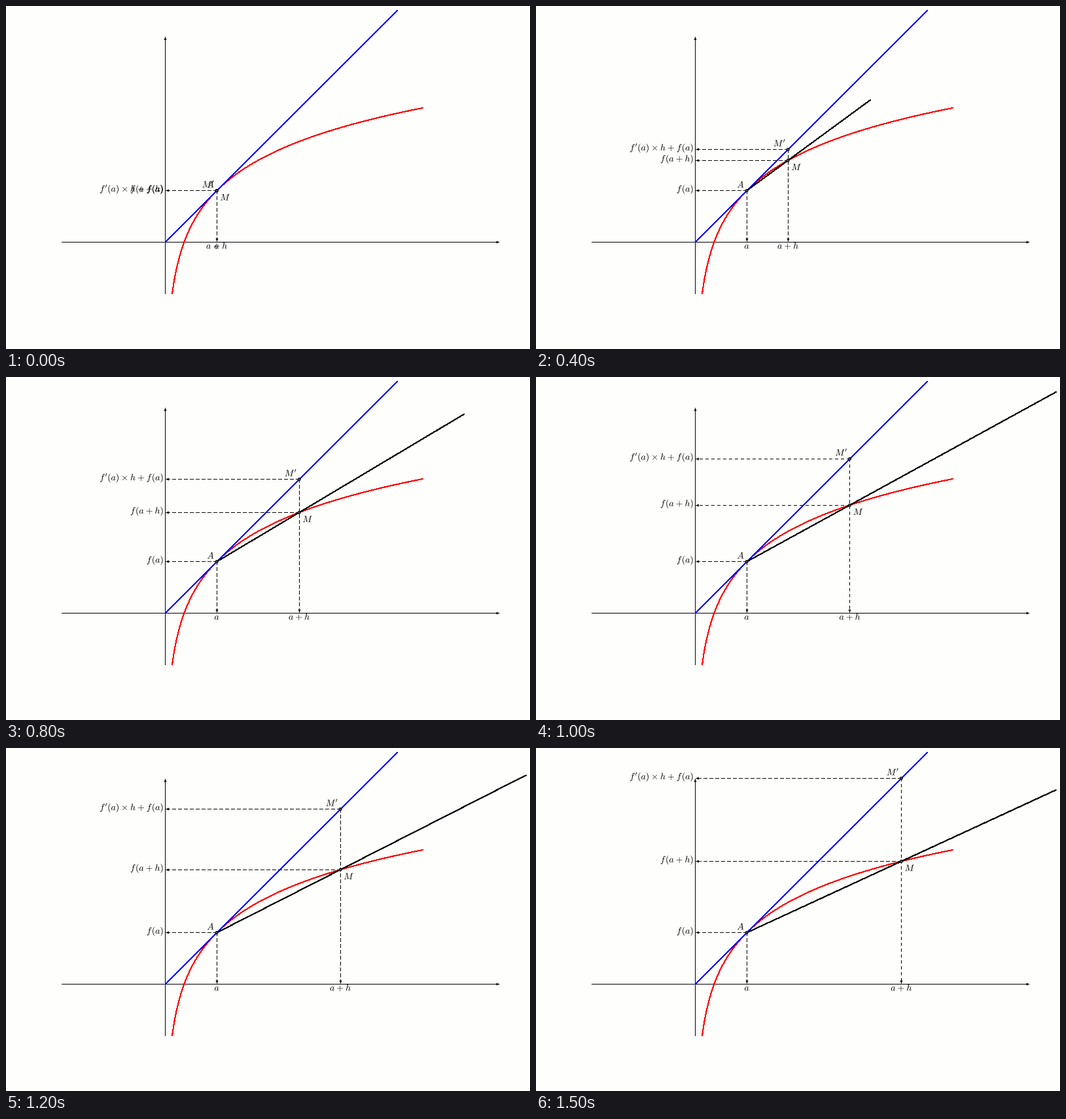
Write a matplotlib script that moves like this. It is 801 by 525 pixels and loops after 1.6 s.

```python
import numpy as np
import matplotlib.pyplot as plt
from matplotlib.animation import FuncAnimation
from matplotlib.collections import LineCollection
from matplotlib.patches import Circle, PathPatch, Polygon
from matplotlib.path import Path
from matplotlib.textpath import TextPath

W, H = 801, 525
UNIT = 78.74                 # pixels per graph unit
OX, OY = 243.4, H - 361.4    # graph origin, y pointing up
X_MAX = 7
STEP = 0.2
N_FRAMES = 16

plt.rcParams.update({"mathtext.fontset": "cm", "path.snap": False})

# 72 dpi makes one point equal one pixel
fig = plt.figure(figsize=(W / 72, H / 72), dpi=72, facecolor="#fefefc")
ax = fig.add_axes([0, 0, 1, 1])

F_A = r"$f\hspace{0.1}(a)$"
F_AH = r"$f\hspace{0.1}(a\hspace{0.05}+\hspace{0.05}h)$"
F_TAN = (r"$f'(a)\hspace{0.05}\times\hspace{0.05}h"
         r"\hspace{0.05}+\hspace{0.05}f\hspace{0.1}(a)$")
AH = r"$a\hspace{0.05}+\hspace{0.05}h$"


def f(x):
    return np.log(x) + 1


def to_px(x, y):
    return OX + UNIT * x, OY + UNIT * y


def centre(v):
    """Middle of the pixel that holds v."""
    return np.floor(v) + 0.5


def stroke(x, y, color):
    """Crisp line, one pixel thick along its main direction."""
    pts = np.column_stack(to_px(np.asarray(x, float), np.asarray(y, float)))
    segs = np.stack([pts[:-1], pts[1:]], axis=1)
    d = np.abs(np.diff(pts, axis=0))
    widths = 1.04 * d.max(axis=1) / np.hypot(d[:, 0], d[:, 1])
    ax.add_collection(LineCollection(
        segs, colors=color, linewidths=widths, antialiaseds=False,
        capstyle="projecting"), autolim=False)


def arrow(start, end, dashed=False):
    """Horizontal or vertical line with a small solid tip at its end."""
    p, q = np.array(to_px(*start)), np.array(to_px(*end))
    axis = 0 if start[1] == end[1] else 1
    p[1 - axis] = q[1 - axis] = centre(p[1 - axis])
    u = (q - p) / np.hypot(*(q - p))
    v = np.array([-u[1], u[0]])
    base = q - 5 * u
    style = (0, (4.15, 4.15)) if dashed else "-"
    ax.plot([p[0], base[0]], [p[1], base[1]], color="black", lw=1,
            ls=style, aa=False, dash_capstyle="butt", solid_capstyle="butt")
    side = [(1.9, 0.55), (3.8, 1.2), (5.5, 2.1)]
    tip = [q] + [q - b * u + w * v for b, w in side]
    tip += [q - b * u - w * v for b, w in side[::-1]]
    ax.add_patch(Polygon(tip, fc="black", lw=0, zorder=3))


def label(text, x, y, align):
    """Math text with its baseline at y, aligned on its visible edge."""
    glyphs = TextPath((0, 0), text, size=13.84)
    box = glyphs.get_extents()
    edge = {"left": box.x0, "right": box.x1,
            "center": (box.x0 + box.x1) / 2}[align]
    path = Path(glyphs.vertices + [x - edge, y], glyphs.codes)
    ax.add_patch(PathPatch(path, fc="black", lw=0, zorder=4))


def dot(x, y):
    ax.add_patch(Circle(to_px(x, y), 2, fc="#4d4d4d", ec="black", lw=1,
                        zorder=5))


def value_label(text, y):
    label(text, 239.5, to_px(0, y)[1] - 1.5, "right")


def abscissa_label(text, x):
    label(text, to_px(x, 0)[0], H - 371.5, "center")


def above_left(text, x, y):
    px, py = to_px(x, y)
    label(text, px - 4.8, py + 4.9, "right")


def below_right(text, x, y):
    px, py = to_px(x, y)
    label(text, px + 5.8, py - 14.8, "left")


def draw(n):
    h = STEP * n
    x = 1 + h
    curve, tangent = f(x), 1 + h

    ax.clear()
    ax.set(xlim=(0, W), ylim=(0, H), autoscale_on=False)
    ax.axis("off")

    arrow((-2, 0), (6.5, 0))
    arrow((0, -1), (0, 4))
    xs = np.geomspace(np.exp(-2), 5, 90)
    stroke(xs, f(xs), "red")
    stroke([0, 4.5], [0, 4.5], "blue")

    if n:
        end = min(1 + 3 * h, X_MAX)
        slope = (curve - 1) / h
        stroke([1, end], [1, 1 + slope * (end - 1)], "black")

    arrow((1, 1), (1, 0), dashed=True)
    arrow((1, 1), (0, 1), dashed=True)
    if n:
        arrow((x, tangent), (x, 0), dashed=True)
        arrow((x, tangent), (0, tangent), dashed=True)
        arrow((x, curve), (0, curve), dashed=True)

    dot(1, 1)
    dot(x, curve)
    dot(x, tangent)

    above_left("$A$", 1, 1)
    below_right("$M$", x, curve)
    above_left("$M'$", x, tangent)
    abscissa_label("$a$", 1)
    abscissa_label(AH, x)
    value_label(F_A, 1)
    value_label(F_AH, curve)
    value_label(F_TAN, tangent)
    return []


anim = FuncAnimation(fig, draw, frames=N_FRAMES, interval=100,
                     init_func=lambda: [], repeat=True)
plt.show()
```
